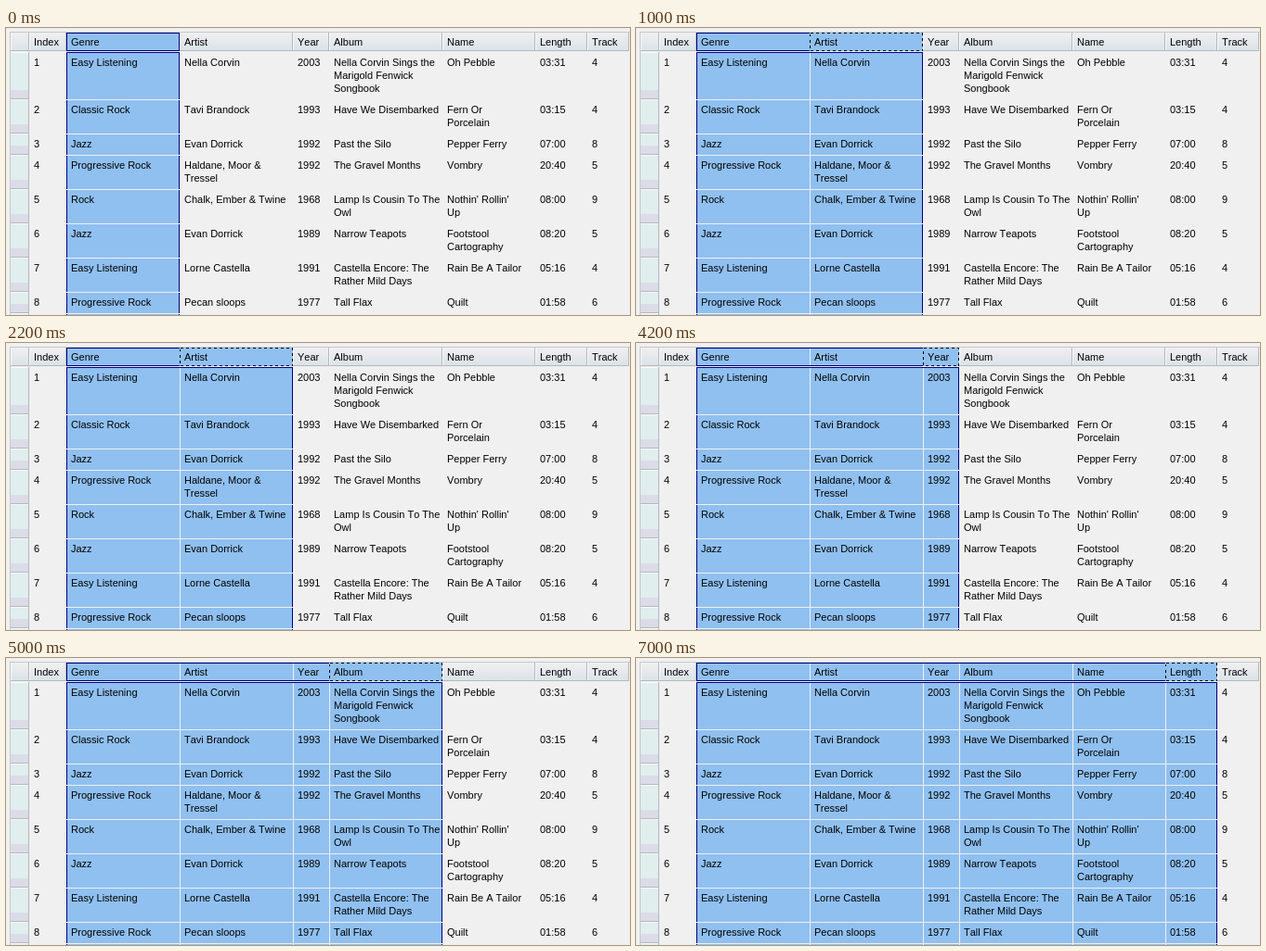
An HTML page that plays this animation: 672 by 310 pixels, repeating every 9 s.

```html
<!DOCTYPE html>
<html lang="en">
<head>
<meta charset="utf-8">
<title>Column selection</title>
<style>
html, body { margin: 0; width: 672px; height: 310px; overflow: hidden; background: #f0f0f0; }
svg { display: block; }
text { font: 11px Arial, "Liberation Sans", sans-serif; font-kerning: none; fill: #000; white-space: pre; }
.step { animation: 9s step-end infinite; }
.s1 { animation-name: s1; }
.s2 { animation-name: s2; }
.s3 { animation-name: s3; }
.s4 { animation-name: s4; }
.s5 { animation-name: s5; }
@keyframes s1 { 0% { visibility: hidden } 5.5556%, 100% { visibility: visible } }
@keyframes s2 { 0% { visibility: hidden } 11.1111%, 100% { visibility: visible } }
@keyframes s3 { 0% { visibility: hidden } 33.3333%, 100% { visibility: visible } }
@keyframes s4 { 0% { visibility: hidden } 55.5556%, 100% { visibility: visible } }
@keyframes s5 { 0% { visibility: hidden } 77.7778%, 100% { visibility: visible } }
</style>
</head>
<body>
<svg id="stage" width="672" height="310" viewBox="0 0 672 310">
  <defs>
    <linearGradient id="head" x2="0" y2="1">
      <stop offset="0" stop-color="#f0f0f0"/>
      <stop offset=".5" stop-color="#e6e8ee"/>
      <stop offset="1" stop-color="#d8e4e6"/>
    </linearGradient>
  </defs>
</svg>
<script>
const NS = 'http://www.w3.org/2000/svg';
const stage = document.getElementById('stage');
const NAVY = '#000080', PALE = '#f0f0f0', BLUE = '#90c0f0', EDGE = '#b4b8bc';

const titles = ['Index', 'Genre', 'Artist', 'Year', 'Album', 'Name', 'Length', 'Track'];
const colX = [25, 65, 187, 309, 348, 470, 570, 626, 671];
const rowY = [26, 77, 114, 137, 174, 211, 248, 285, 308];
const rows = [
  ['1', 'Easy Listening', 'Nella Corvin', '2003', 'Nella Corvin Sings the|Marigold Fenwick|Songbook', 'Oh Pebble', '03:31', '4'],
  ['2', 'Classic Rock', 'Tavi Brandock', '1993', 'Have We Disembarked', 'Fern Or|Porcelain', '03:15', '4'],
  ['3', 'Jazz', 'Evan Dorrick', '1992', 'Past the Silo', 'Pepper Ferry', '07:00', '8'],
  ['4', 'Progressive Rock', 'Haldane, Moor &|Tressel', '1992', 'The Gravel Months', 'Vombry', '20:40', '5'],
  ['5', 'Rock', 'Chalk, Ember & Twine', '1968', 'Lamp Is Cousin To The|Owl', "Nothin' Rollin'|Up", '08:00', '9'],
  ['6', 'Jazz', 'Evan Dorrick', '1989', 'Narrow Teapots', 'Footstool|Cartography', '08:20', '5'],
  ['7', 'Easy Listening', 'Lorne Castella', '1991', 'Castella Encore: The|Rather Mild Days', 'Rain Be A Tailor', '05:16', '4'],
  ['8', 'Progressive Rock', 'Pecan sloops', '1977', 'Tall Flax', 'Quilt', '01:58', '6']
];

function add(parent, tag, attrs) {
  const el = document.createElementNS(NS, tag);
  for (const key in attrs) el.setAttribute(key, attrs[key]);
  return parent.appendChild(el);
}

const box = (parent, x, y, width, height, fill) =>
  add(parent, 'rect', { x, y, width, height, fill, 'shape-rendering': 'crispEdges' });

const outline = (parent, x, y, w, h, stroke, dash = 'none') =>
  add(parent, 'rect', {
    x: x + .5, y: y + .5, width: w - 1, height: h - 1, fill: 'none', stroke,
    'stroke-dasharray': dash, 'shape-rendering': 'crispEdges'
  });

function label(str, x, y) {
  str.split('|').forEach((line, i) => {
    add(stage, 'text', { x, y: y + 14 * i }).textContent = line;
  });
}

function drawFrame() {
  box(stage, 4, 4, 668, 1, '#c8c8cc');
  box(stage, 4, 4, 1, 306, '#c8c8cc');
  [5, ...colX.slice(0, -1)].forEach((x, i) => {
    const w = colX[i] - x;
    box(stage, x, 5, w, 20, 'url(#head)');
    box(stage, x, 5, 1, 19, '#fafafa');
    box(stage, x + w - 1, 5, 1, 20, EDGE);
    box(stage, x, 24, w, 1, EDGE);
  });
  rowY.forEach((y, i) => {
    const h = (rowY[i + 1] || 331) - y;
    box(stage, 5, y, 19, h, '#e0eeee');
    box(stage, 5, y, 19, 1, '#f8f8f8');
    box(stage, 5, y + h - 10, 19, 9, '#dcdce8');
    box(stage, 5, y + h - 1, 19, 1, EDGE);
    box(stage, 24, y, 1, h, EDGE);
  });
}

// Selection from Genre through column `last`; each one covers the previous.
function drawSelection(step, last) {
  const g = add(stage, 'g', step ? { class: 'step s' + step } : {});
  const x = colX[1], end = colX[last + 1], w = end - x;
  const cell = colX[last], cellW = end - cell;
  box(g, x, 5, w, 305, BLUE);
  for (let c = 2; c <= last; c++) box(g, colX[c], 5, 1, 305, PALE);
  box(g, x, 25, w, 1, PALE);
  outline(g, x, 26, w, 300, NAVY);
  for (const y of rowY.slice(1)) box(g, x, y, w, 1, PALE);
  if (last > 1) {
    box(g, x, 5, cell - x, 1, NAVY);
    box(g, x, 24, cell - x, 1, NAVY);
    box(g, x, 5, 1, 20, NAVY);
  }
  if (step) {
    box(g, cell, 5, cellW, 20, BLUE);
    outline(g, cell, 5, cellW, 20, '#000', '3 3');
  } else {
    outline(g, cell, 5, cellW, 20, NAVY);
  }
}

drawFrame();
[1, 1, 2, 3, 4, 6].forEach((last, step) => drawSelection(step, last));

titles.forEach((title, c) => label(title, colX[c] + 5, 19));
rows.forEach((row, r) => row.forEach((str, c) => label(str, colX[c] + 5, rowY[r] + 15)));
</script>
</body>
</html>
```
